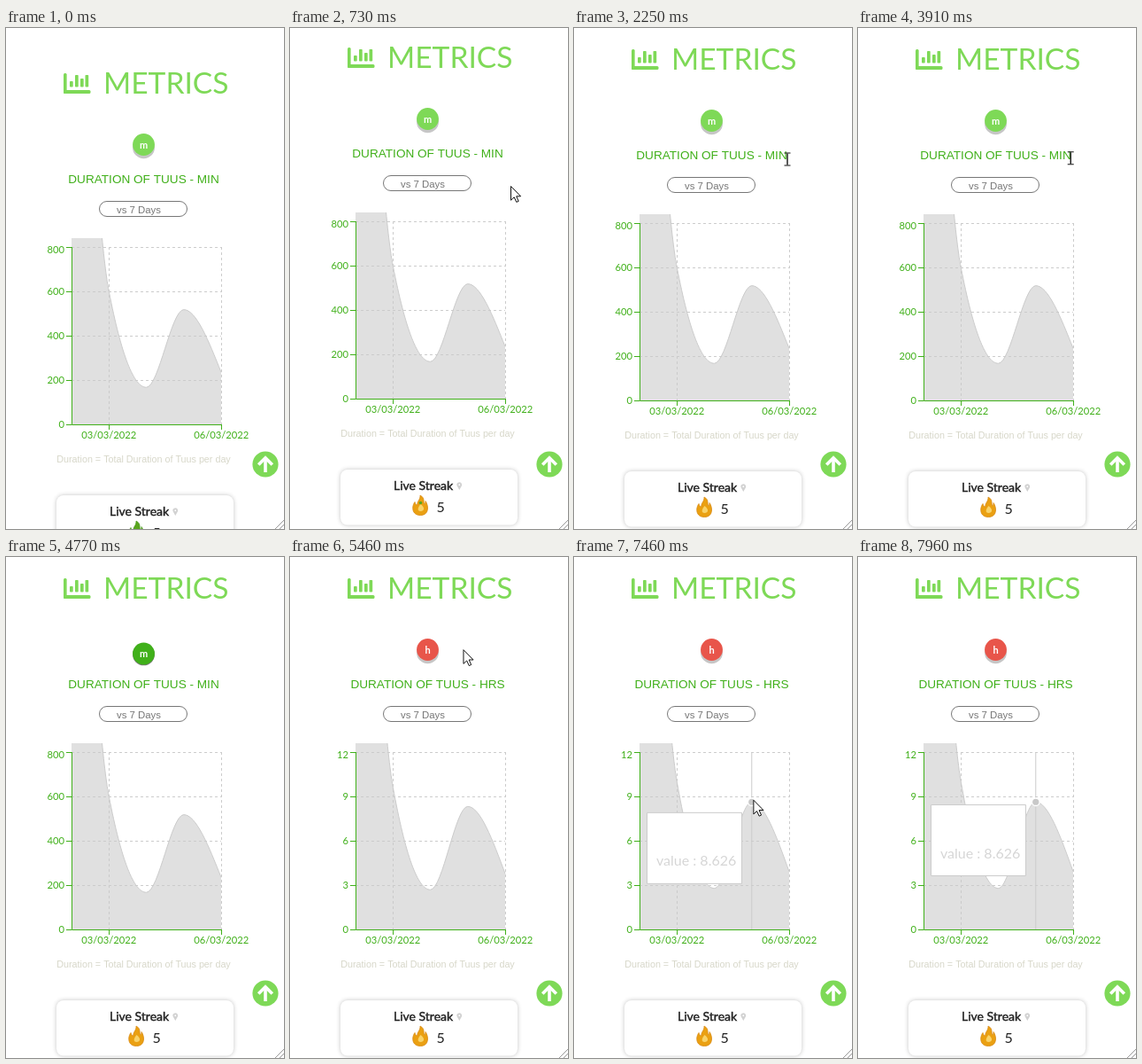
Animation of 314x565 px, one loop 7990 ms. Source, as an HTML page with a canvas:

```html
<!DOCTYPE html>
<html lang="en">
<head>
<meta charset="utf-8">
<title>Metrics</title>
<style>
html, body { margin: 0; width: 100%; height: 100%; overflow: hidden; background: #fff; }
canvas { display: block; width: 314px; height: 565px; }
</style>
</head>
<body>
<canvas id="stage"></canvas>
<script>
const W = 314, H = 565, LOOP = 7990;
const LIGHT = '#7ed957', GREEN = '#40b01a', RED = '#e8554a', GREY = '#cccccc';
const LATO = 'Lato, sans-serif', ARIAL = '"Liberation Sans", Arial, sans-serif';
const PRESS = 4770, SWITCH = 4900, TIP = 7260;

const canvas = document.getElementById('stage');
const ctx = canvas.getContext('2d');
const dpr = window.devicePixelRatio || 1;
canvas.width = W * dpr;
canvas.height = H * dpr;

// [time, scroll offset], held until the next entry
const SCROLL = [[0, 0], [660, 13], [690, 29], [750, 40], [960, 38], [990, 33], [1040, 29], [1070, 27]];

// [time, x, y] of the pointer, joined smoothly
const POINTER = [
  [200, 277, 441], [360, 249, 178], [1370, 249, 178], [1580, 204, 138], [1740, 173, 121],
  [1940, 205, 145], [2140, 237, 148], [2250, 241, 148], [2460, 241, 148], [2620, 213, 147],
  [2790, 240, 147], [3910, 240, 147], [4100, 282, 104], [4300, 246, 61], [4500, 190, 80],
  [4690, 152, 105], [5100, 152, 105], [5540, 205, 104], [5800, 198, 97], [6040, 193, 97],
  [6410, 193, 97], [6490, 194, 104], [6800, 203, 210], [7130, 208, 292], [7260, 207, 290],
  [7520, 201, 269], [7950, 201, 269]
];

// chart geometry in page coordinates
const X0 = 74, X1 = 243, TOP = 247, BASE = 447, STEP = (X1 - X0) / 4;
const MINUTES = [3200, 600, 167, 517.56, 235];
const toY = max => MINUTES.map(v => BASE - v / max * (BASE - TOP));
const Y_MIN = toY(800), Y_HRS = toY(720);

const held = (list, t) => list.reduce((v, [at, n]) => t >= at ? n : v, 0);
const clamp = v => Math.max(0, Math.min(1, v));
const lerp = (a, b, k) => a + (b - a) * k;

// the CSS "ease" curve
function ease(p) {
  if (p <= 0 || p >= 1) return clamp(p);
  const bez = (a, b, s) => 3 * a * s * (1 - s) ** 2 + 3 * b * s * s * (1 - s) + s ** 3;
  let lo = 0, hi = 1;
  for (let i = 0; i < 20; i++) {
    const mid = (lo + hi) / 2;
    if (bez(0.25, 0.25, mid) < p) lo = mid; else hi = mid;
  }
  return bez(0.1, 1, lo);
}

function pointerAt(t) {
  let i = 0;
  while (i < POINTER.length - 2 && t >= POINTER[i + 1][0]) i++;
  const [ta, xa, ya] = POINTER[i], [tb, xb, yb] = POINTER[i + 1];
  const k = clamp((t - ta) / (tb - ta));
  return [lerp(xa, xb, k), lerp(ya, yb, k)];
}

function text(str, x, y, size, family, color, align = 'center', weight = 400) {
  ctx.font = `${weight} ${size}px ${family}`;
  ctx.textAlign = align;
  ctx.fillStyle = color;
  ctx.fillText(str, x, y);
}

function line(color, width, ...pts) {
  ctx.beginPath();
  pts.forEach(([x, y]) => ctx.lineTo(x, y));
  ctx.strokeStyle = color;
  ctx.lineWidth = width;
  ctx.stroke();
}

function disc(x, y, r, color) {
  ctx.beginPath();
  ctx.arc(x, y, r, 0, Math.PI * 2);
  ctx.fillStyle = color;
  ctx.fill();
}

function box(x, y, w, h, r) {
  ctx.beginPath();
  ctx.roundRect(x, y, w, h, r);
}

function header() {
  ctx.fillStyle = LIGHT;
  box(65, 51, 3.6, 23, 1.5); ctx.fill();
  box(65, 70, 30.5, 4, 1.5); ctx.fill();
  [[72, 60], [78, 53], [84, 57], [89.5, 53]].forEach(([x, y]) => {
    box(x, y, 3.7, 66.5 - y, 0.8);
    ctx.fill();
  });
  text('METRICS', 110, 74, 33.6, LATO, LIGHT, 'left');
}

function unitButton(t, hours) {
  const down = t >= PRESS && t < SWITCH;
  const y = down ? 136 : 131.5;
  disc(155.5, y + (down ? 0.8 : 3.2), 12.5, down ? '#777' : '#c6c6c6');
  disc(155.5, y, 12.4, hours ? RED : down ? GREEN : LIGHT);
  text(hours ? 'h' : 'm', 155.5, y + 4.3, 11, LATO, '#fff', 'center', 700);
}

function picker() {
  box(105.5, 195.5, 99, 17, 8.5);
  ctx.strokeStyle = '#777';
  ctx.lineWidth = 1;
  ctx.stroke();
  text('vs 7 Days', 125, 209, 11.4, ARIAL, '#777', 'left');
}

// monotone tangents for evenly spaced points
function tangents(ys) {
  const s = ys.slice(1).map((y, i) => (y - ys[i]) / STEP);
  const m = ys.map((_, i) => {
    const a = s[i - 1], b = s[i];
    if (a === undefined || b === undefined) return 0;
    return (Math.sign(a) + Math.sign(b)) * Math.min(Math.abs(a), Math.abs(b), Math.abs(a + b) / 4);
  });
  const n = ys.length - 1;
  m[0] = (3 * s[0] - m[1]) / 2;
  m[n] = (3 * s[n - 1] - m[n - 1]) / 2;
  return m;
}

function curve(ys) {
  const m = tangents(ys), d = STEP / 3;
  ctx.beginPath();
  ctx.moveTo(X0, ys[0]);
  for (let i = 1; i < ys.length; i++) {
    const x = X0 + i * STEP;
    ctx.bezierCurveTo(x - 2 * d, ys[i - 1] + m[i - 1] * d, x - d, ys[i] - m[i] * d, x, ys[i]);
  }
}

function area(ys) {
  ctx.save();
  ctx.beginPath();
  ctx.rect(X0 - 1, TOP - 10, X1 - X0 + 2, BASE - TOP + 10);
  ctx.clip();
  curve(ys);
  ctx.lineTo(X1, BASE);
  ctx.lineTo(X0, BASE);
  ctx.globalAlpha = 0.6;
  ctx.fillStyle = GREY;
  ctx.fill();
  ctx.globalAlpha = 1;
  curve(ys);
  ctx.strokeStyle = GREY;
  ctx.lineWidth = 1;
  ctx.stroke();
  ctx.restore();
}

function chart(t, hours) {
  const rows = [0, 1, 2, 3, 4].map(i => BASE - i * 50 + 0.5);
  const cols = [X0 + STEP, X1].map(x => Math.floor(x) + 0.5);
  const left = X0 + 0.5, bottom = BASE + 0.5;

  ctx.setLineDash([3, 3]);
  rows.forEach(y => line(GREY, 1, [X0, y], [X1, y]));
  [left, ...cols].forEach(x => line(GREY, 1, [x, TOP], [x, BASE]));
  ctx.setLineDash([]);

  const k = ease((t - SWITCH) / 1500);
  area(Y_MIN.map((y, i) => lerp(y, Y_HRS[i], k)));

  line(GREEN, 1, [left, TOP], [left, bottom], [X1 + 0.5, bottom]);
  rows.forEach((y, i) => {
    line(GREEN, 1, [X0 - 6, y], [X0, y]);
    text(String(i * (hours ? 3 : 200)), 66, y + (i === 4 ? 6.8 : 3.8), 11.2, LATO, GREEN, 'right');
  });
  cols.forEach((x, i) => {
    line(GREEN, 1, [x, BASE], [x, BASE + 6]);
    text(['03/03/2022', '06/03/2022'][i], x - 0.3, 463, 11.2, LATO, GREEN);
  });
  text('Duration = Total Duration of Tuus per day', 155.5, 490, 10.75, ARIAL, '#d7d7c9');
}

function tooltip(t) {
  const x = X0 + 3 * STEP, y = lerp(327, 306, ease((t - TIP) / 600));
  line(GREY, 1, [x, TOP], [x, BASE]);
  disc(x, Y_HRS[3], 5, '#fff');
  disc(x, Y_HRS[3], 3.6, '#c8c8c8');
  ctx.fillStyle = '#fff';
  ctx.strokeStyle = GREY;
  ctx.lineWidth = 1;
  ctx.beginPath();
  ctx.rect(82.5, y + 0.5, 107, 80);
  ctx.fill();
  ctx.stroke();
  text('value : 8.626', 93, y + 60.5, 16, LATO, '#d6d6d6', 'left');
}

function flame(t) {
  ctx.save();
  ctx.translate(139, 556);
  ctx.beginPath();
  ctx.moveTo(8, 0);
  ctx.bezierCurveTo(14, 3, 11, 8, 13, 10);
  ctx.bezierCurveTo(14, 9, 14, 7.5, 14, 6.5);
  ctx.bezierCurveTo(18, 12, 18, 22.5, 8.5, 22.5);
  ctx.bezierCurveTo(-2, 22.5, -1.5, 12, 2, 7.5);
  ctx.bezierCurveTo(2.5, 10, 3.5, 11, 5, 11);
  ctx.bezierCurveTo(4, 7, 8.5, 5, 8, 0);
  ctx.fillStyle = t < 690 ? '#5aa51e' : '#eaa012';
  ctx.fill();
  ctx.strokeStyle = t < 690 ? '#4a9a1c' : '#d88a14';
  ctx.lineWidth = 0.8;
  ctx.stroke();
  ctx.beginPath();
  ctx.moveTo(8.5, 10);
  ctx.bezierCurveTo(14, 14, 12.5, 18, 8.5, 18);
  ctx.bezierCurveTo(4.5, 18, 5, 14, 8.5, 10);
  ctx.fillStyle = '#f8d36a';
  ctx.fill();
  if (t < 1070) disc(8.5, 8.5, 1.8, '#5aa51e');
  ctx.restore();
}

function card(t) {
  ctx.save();
  ctx.shadowColor = 'rgba(0,0,0,.24)';
  ctx.shadowBlur = 5 * dpr;
  ctx.fillStyle = '#fff';
  box(57, 527, 200, 62.5, 8);
  ctx.fill();
  ctx.restore();

  text('Live Streak', 117, 550, 14, LATO, '#222', 'left');
  ctx.strokeStyle = '#222';
  ctx.lineWidth = 0.45;
  ctx.strokeText('Live Streak', 117, 550);

  ctx.beginPath();
  ctx.arc(191.3, 544.2, 2.9, Math.PI * 0.9, Math.PI * 2.1);
  ctx.lineTo(191.3, 550);
  ctx.fillStyle = '#d2d2d2';
  ctx.fill();
  disc(191.3, 544.2, 0.9, '#fff');

  flame(t);
  text('5', 165.5, 575, 16, LATO, '#222', 'left');
}

function fixedParts() {
  disc(293, 492, 14.6, LIGHT);
  ctx.lineJoin = 'miter';
  line('#fff', 3.6, [285.2, 492.6], [293, 484.8], [300.8, 492.6]);
  line('#fff', 3.6, [293, 486], [293, 501]);
  line('#999', 1, [304, 565], [314, 555]);
  line('#999', 1, [309, 565], [314, 560]);
}

function shape(pts) {
  ctx.beginPath();
  pts.forEach(([x, y]) => ctx.lineTo(x, y));
  ctx.closePath();
  ctx.fillStyle = '#fff';
  ctx.fill();
  ctx.strokeStyle = '#111';
  ctx.lineWidth = 1;
  ctx.stroke();
}

function arrow() {
  shape([[0.5, 0.5], [0.5, 16.2], [4.2, 12.8], [6.8, 18.4], [9.2, 17.3], [6.7, 11.8], [11.6, 11.8]]);
}

function beam() {
  line('#111', 1.4, [0, -6.5], [0, 6.5]);
  [-7, 7].forEach(y => line('#111', 1, [-3.5, y], [3.5, y]));
}

function hand() {
  shape([[-1, 0], [1.5, 0], [2, 7], [5, 7], [8, 8], [11, 9.5], [11, 15], [9, 20],
    [0, 20], [-4.5, 13], [-4, 11], [-1.5, 12.5]]);
}

function pointer(t) {
  if (t < 200 || t >= 7950 || (t >= 4760 && t < SWITCH)) return;
  const [x, y] = pointerAt(t);
  const onTitle = x > 70 && x < 242 && y > 134 && y < 154 && t < 4000;
  const onButton = Math.hypot(x - 155.5, y - 105) < 13;
  ctx.save();
  ctx.translate(x, y);
  if (onTitle) beam();
  else if (onButton) hand();
  else arrow();
  ctx.restore();
}

function draw(t) {
  const hours = t >= SWITCH;
  ctx.setTransform(dpr, 0, 0, dpr, 0, 0);
  ctx.fillStyle = '#fff';
  ctx.fillRect(0, 0, W, H);

  ctx.save();
  ctx.translate(0, -held(SCROLL, t));
  header();
  unitButton(t, hours);
  text('DURATION OF TUUS - ' + (hours ? 'HRS' : 'MIN'), 155.5, 175, 13.6, ARIAL, GREEN);
  picker();
  chart(t, hours);
  card(t);
  if (t >= TIP) tooltip(t);
  ctx.restore();

  fixedParts();
  pointer(t);
}

function tick() {
  draw(performance.now() % LOOP);
  requestAnimationFrame(tick);
}
tick();
</script>
</body>
</html>
```
